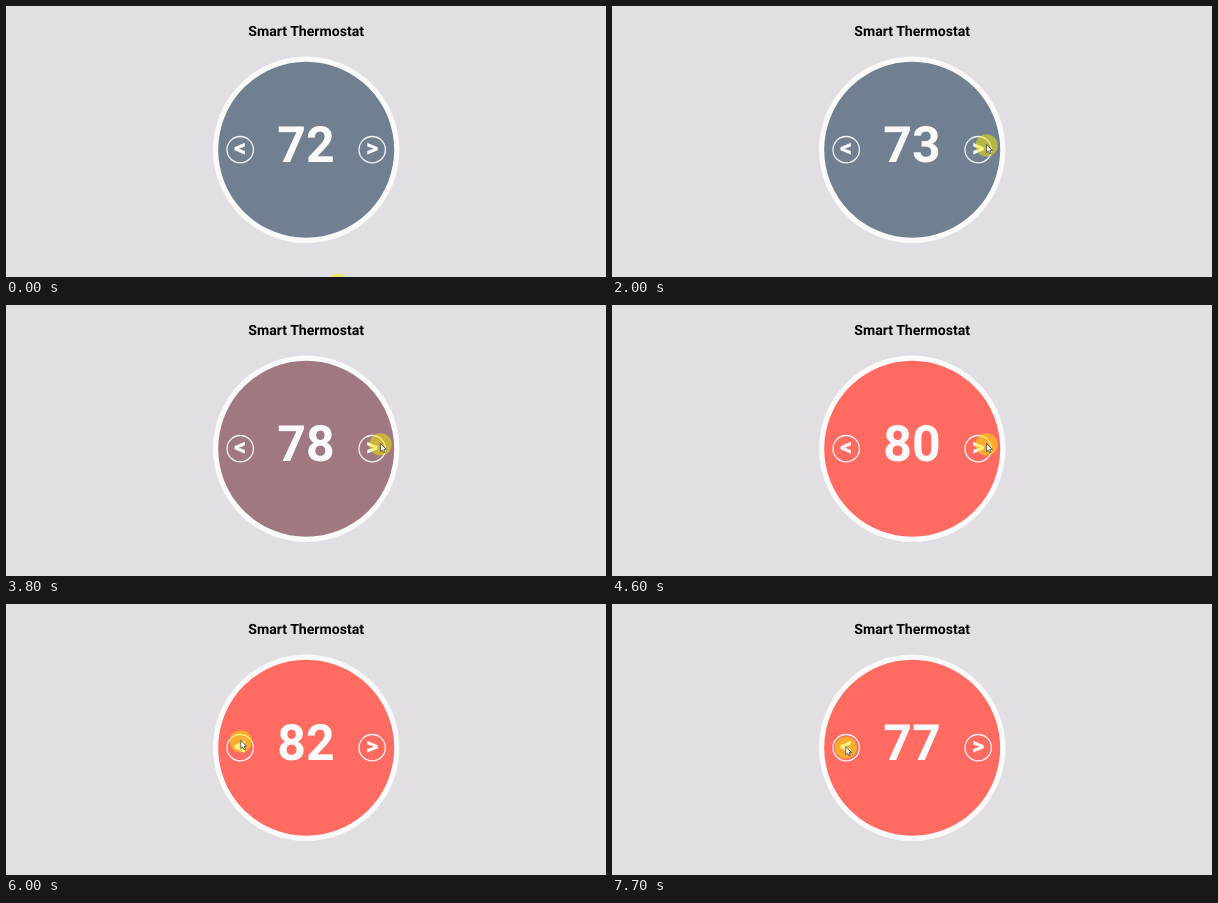
An HTML page for the animation above (8000 ms loop, 600 by 271 pixels).

```html
<!DOCTYPE html>
<html lang="en">
<head>
<meta charset="utf-8">
<title>Smart Thermostat</title>
<style>
  html, body { margin: 0; width: 100%; height: 100%; overflow: hidden; background: #e1dfe4; }
  svg { display: block; width: 600px; height: 271px; }
  text {
    font-family: Roboto, Arial, sans-serif; font-weight: 700;
    text-anchor: middle; text-rendering: geometricPrecision;
  }
  .title { font-size: 14.1px; fill: #000; }
  .temp { font-size: 50px; fill: #fafafa; }
  .sign { font-size: 24px; fill: #fafafa; stroke: #fafafa; stroke-width: .3; }
  .dial { stroke: #fafafa; stroke-width: 5.2; }
  .button { fill: none; stroke: #f4f4f6; stroke-width: 1.3; }
</style>
</head>
<body>
<svg viewBox="0 0 600 271">
  <text class="title" x="300.2" y="30">Smart Thermostat</text>
  <circle id="dial" class="dial" cx="300.2" cy="143.8" r="90.6"/>
  <circle class="button" cx="234.2" cy="143.7" r="13.2"/>
  <circle class="button" cx="366.2" cy="143.7" r="13.2"/>
  <text class="sign" x="234" y="150">&lt;</text>
  <text class="sign" x="366.2" y="150">&gt;</text>
  <text id="temp" class="temp" x="300" y="156.4">72</text>
  <g id="pointer">
    <circle r="11.1" fill="#f5eb00" fill-opacity=".5"/>
    <path d="M0-1V7.2L1.9 5.5 3.2 8.4 4.6 7.8 3.3 5H5.8Z" fill="#fff" stroke="#333" stroke-width=".7"/>
  </g>
</svg>
<script>
  const LOOP = 8000, STEP = 100;
  const byId = id => document.getElementById(id);
  const dial = byId('dial'), temp = byId('temp'), pointer = byId('pointer');

  const progress = (t, from, to) => Math.min(1, Math.max(0, (t - from) / (to - from)));
  const smooth = k => k * k * (3 - 2 * k);
  const easeOut = k => 1 - (1 - k) ** 2;

  // Number of evenly spaced clicks made by time t
  const clicks = (t, first, gap, max) =>
    Math.min(max, Math.max(0, Math.floor((t - first) / gap) + 1));

  function draw(now) {
    const t = Math.floor(now % LOOP / STEP) * STEP;

    temp.textContent = 72 + clicks(t, 1910, 378, 10) - clicks(t, 6390, 327, 5);

    const heat = progress(t, 3700, 4000);
    dial.setAttribute('fill', `color-mix(in srgb, #ff6b61 ${heat * 100}%, #708090)`);
    dial.style.fill = dial.getAttribute('fill');

    // Rise to the right button, arc over to the left one, then settle on it
    const rise = easeOut(progress(t, 0, 900));
    const slide = smooth(progress(t, 5500, 6000));
    const settle = progress(t, 6000, 6200);
    const x = 332 + 42.6 * rise - 139.8 * slide - settle;
    const y = 278.6 - 139.2 * rise - 14 * Math.sin(Math.PI * slide) - 2 * slide + 6.2 * settle;
    pointer.setAttribute('transform', `translate(${x} ${y})`);
  }

  const start = performance.now();
  function tick() {
    draw(performance.now() - start);
    requestAnimationFrame(tick);
  }
  tick();
</script>
</body>
</html>
```
